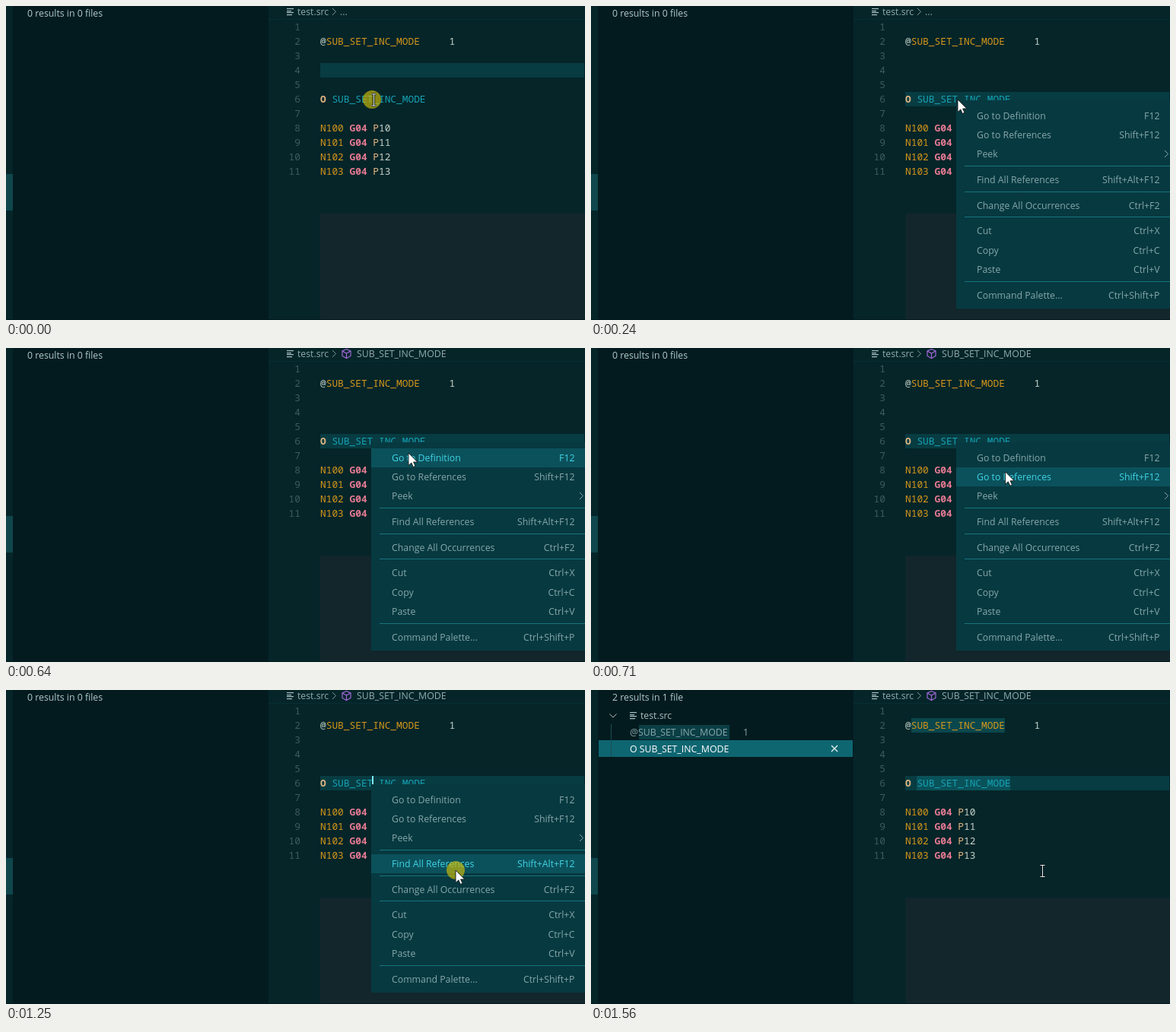
Write an HTML page with a canvas that moves like this. It is 761x413 px and loops after 2.26 s.

```html
<!DOCTYPE html>
<html>
<head>
<meta charset="utf-8">
<style>
html, body { margin: 0; width: 100%; height: 100%; overflow: hidden; background: #052529; }
canvas { display: block; }
</style>
</head>
<body>
<canvas id="stage" width="761" height="413"></canvas>
<script>
const c = document.getElementById('stage').getContext('2d');
const LOOP = 2260;
const UI = '12.3px "Open Sans", "Noto Sans", sans-serif';
const MONO = '12.83px "Noto Sans Mono", "DejaVu Sans Mono", monospace';
const CHAR = 7.7, LEFT = 413, NAME = 'SUB_SET_INC_MODE';
const ORANGE = '#d5971a', PALE = '#c5d3c9', PEACH = '#e4b781', PINK = '#e67a92', TEAL = '#16a3b6';

// Column and text of each coloured piece, by line number
const code = {
  2: [[0, '@', PALE], [1, NAME, ORANGE], [22, '1', PALE]],
  6: [[0, 'O', PEACH, 1], [2, NAME, TEAL]]
};
for (let i = 0; i < 4; i++)
  code[8 + i] = [[0, 'N10' + i, ORANGE], [5, 'G04', PINK, 1], [9, 'P', PEACH], [10, '1' + i, PALE]];

const menu = [
  [144, 'Go to Definition', 'F12'], [169, 'Go to References', 'Shift+F12'], [194, 'Peek', ''],
  [228, 'Find All References', 'Shift+Alt+F12'], [262, 'Change All Occurrences', 'Ctrl+F2'],
  [295, 'Cut', 'Ctrl+X'], [321, 'Copy', 'Ctrl+C'], [346, 'Paste', 'Ctrl+V'],
  [380, 'Command Palette...', 'Ctrl+Shift+P']
];

function box(x, y, w, h, color) {
  c.fillStyle = color;
  c.fillRect(x, y, w, h);
}

function text(s, x, y, color, font = UI, align = 'left') {
  c.font = font;
  c.textAlign = align;
  c.fillStyle = color;
  c.fillText(s, x, y);
}

function line(points, color, width = 1) {
  c.beginPath();
  points.forEach(([x, y]) => c.lineTo(x, y));
  c.strokeStyle = color;
  c.lineWidth = width;
  c.stroke();
}

function fileIcon(x, y) {
  [9, 6, 9, 7].forEach((w, i) => box(x, y + i * 3 - (i > 1), w, 1.2, '#a9c0c2'));
}

function drawPanel(t) {
  box(0, 0, 9, 413, '#052529');
  box(0, 221, 9, 48, '#0f474c');
  box(9, 0, 336, 413, '#031b1f');
  if (t < 1410) text('0 results in 0 files', 28, 14, '#b2cacd');
  if (t < 1560) return;
  text('2 results in 1 file', 28, 14, '#b2cacd');
  line([[24.5, 31.5], [29, 36], [33.5, 31.5]], '#a9c0c2');
  fileIcon(51, 29);
  text('test.src', 65, 38, '#a9c0c2');
  box(63, 46, 119, 19, '#0a3f45');
  text('@' + NAME, 51, 60, '#87a7ab');
  text('1', 200, 60, '#87a7ab');
  box(10, 66, 334, 22, '#0e6671');
  text('O ' + NAME, 51, 82, '#ffffff');
  box(26, 45, 1, 43, '#1d4c51');
  line([[316, 73], [324, 81]], '#e8f2f2', 1.2);
  line([[324, 73], [316, 81]], '#e8f2f2', 1.2);
}

function drawEditor(t) {
  box(345, 0, 416, 413, '#052529');
  box(345, 17, 416, 1, '#082f33');
  box(LEFT, 273, 348, 139, '#12262b');

  fileIcon(369, 3);
  text('test.src', 383, 12, '#8fadb0');
  line([[429, 3], [433.5, 7.5], [429, 12]], '#7d999c');
  if (t < 320) text('...', 439, 12, '#8fadb0');
  else {
    line([[447.5, 1.5], [453, 4], [453, 10.5], [447.5, 13.5], [442, 10.5], [442, 4], [447.5, 1.5]], '#a068d8', 1.2);
    line([[442, 4], [447.5, 7], [453, 4]], '#a068d8', 1.2);
    line([[447.5, 7], [447.5, 13.5]], '#a068d8', 1.2);
    text(NAME, 461, 12, '#8fadb0');
  }

  box(LEFT, t < 170 ? 75 : 113, 347, 19, '#073c42');
  if (t >= 1410) {
    box(421, 37, 123, 19, '#0a474d');
    box(428, 113, 123, 19, '#0a525a');
  }
  for (let n = 1; n <= 11; n++) {
    const y = 13 + n * 19;
    text(n, 387, y, '#3f5b5e', MONO, 'right');
    for (const [col, s, color, bold] of code[n] || [])
      text(s, LEFT + col * CHAR, y, color, (bold ? 'bold ' : '') + MONO);
  }
  if (t >= 1250 && t < 1560) box(481, 113, 2, 19, '#7fe9f5');
  box(0, 412, 761, 1, '#031b1f');
}

function drawMenu(t, mouseY) {
  c.globalAlpha = t < 240 ? 0.13 : 1;
  box(480, 124, 281, 274, '#073940');
  for (const y of [210, 244, 277, 362]) box(491, y, 270, 1, '#17747e');
  for (const [y, label, keys] of menu) {
    const hot = t >= 640 && Math.abs(mouseY - y - 0.5) < 12.5;
    const color = hot ? '#40d4e7' : '#85a8ab';
    if (hot) box(480, y - 12, 281, 25, '#0b515b');
    text(label, 507, y + 5, color);
    text(keys, 747.5, y + 5, color, UI, 'right');
    if (label === 'Peek') line([[754, y - 4], [758.5, y + 0.5], [754, y + 5]], color);
  }
  c.globalAlpha = 1;
}

function drawClick(x, y) {
  c.beginPath();
  c.arc(x, y, 12, 0, 7);
  c.fillStyle = 'rgba(200,184,10,0.68)';
  c.fill();
}

function drawArrow(x, y) {
  c.beginPath();
  [[0, 0], [0, 16.5], [3.8, 13], [6.3, 18.5], [9, 17.3], [6.6, 12], [11.8, 12]]
    .forEach(([dx, dy]) => c.lineTo(x + dx, y + dy));
  c.closePath();
  c.fillStyle = '#fff';
  c.fill();
  c.strokeStyle = '#101818';
  c.lineWidth = 0.9;
  c.stroke();
}

function drawBeam(x, y) {
  for (const [color, width] of [['#0a1618', 2.6], ['#e8eeee', 1]]) {
    line([[x - 3, y - 7.5], [x + 3, y - 7.5]], color, width);
    line([[x, y - 7.5], [x, y + 7.5]], color, width);
    line([[x - 3, y + 7.5], [x + 3, y + 7.5]], color, width);
  }
}

// The pointer moves in discrete steps
function pointer(t) {
  if (t < 640) return [482, 123];
  const p = [710, 790, 870, 950].filter(step => t >= step).length / 4;
  return [529 + 62 * p, 138 + 99 * p];
}

function draw(t) {
  const [x, y] = pointer(t);
  drawPanel(t);
  drawEditor(t);
  if (t < 170) {
    drawClick(481, 123);
    drawBeam(483.5, 123.5);
  } else if (t < 1330) {
    drawMenu(t, y);
    if (t >= 1250) drawClick(x, y);
    drawArrow(x, y);
  } else drawBeam(593.5, 238);
}

function tick() {
  draw(performance.now() % LOOP);
  requestAnimationFrame(tick);
}
tick();
</script>
</body>
</html>
```
